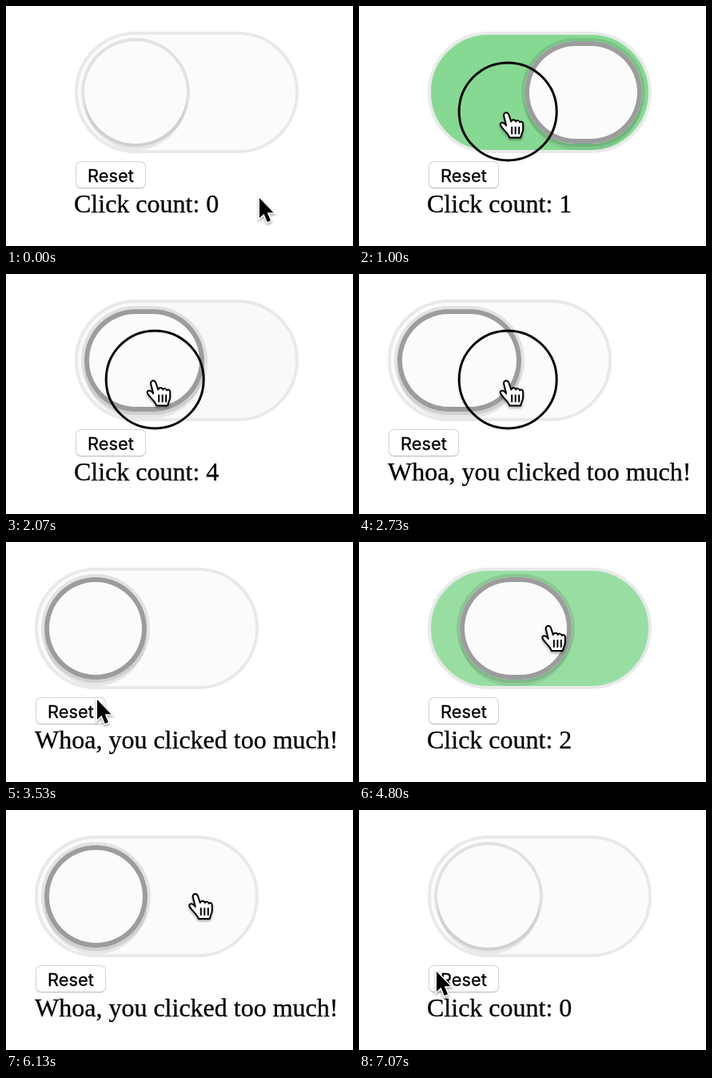
Write an HTML page that moves like this. It is 434x300 px and loops after 7140 ms.

```html
<!DOCTYPE html>
<html lang="en">
<head>
<meta charset="utf-8">
<title>Toggle click counter</title>
<style>
  html, body { margin: 0; width: 100%; height: 100%; overflow: hidden; background: #fff; }
  #stage { position: relative; width: 434px; height: 300px; overflow: hidden; background: #fff; }
  #panel { position: absolute; left: 86px; top: 0; }
  #track {
    position: absolute; left: 0; top: 32px; width: 280px; height: 152px;
    box-sizing: border-box; border: 4px solid #e8eae9; border-radius: 76px;
  }
  #knob {
    --ring: 0 0 0 4px rgba(0, 0, 0, .1), 0 8px 0 rgba(0, 0, 0, .08);
    position: absolute; left: 8px; top: 8px; width: 128px; height: 128px;
    border-radius: 64px; background: #fbfbfb; box-shadow: var(--ring);
  }
  #knob.focus { box-shadow: var(--ring), inset 0 0 0 6px #9c9c9c; }
  #reset, #label { color: #000; -webkit-text-stroke: .3px #000; }
  #reset {
    position: absolute; left: 1px; top: 194px; width: 88px; height: 34px;
    box-sizing: border-box; border: 1px solid #d4d4d4; border-bottom-color: #c2c2c2;
    border-radius: 7px; background: #fff; box-shadow: 0 1px 1px rgba(0, 0, 0, .08);
    font: 21.8px/35px Inter, Roboto, sans-serif; text-align: center;
  }
  #label {
    position: absolute; left: -1px; top: 229px; white-space: nowrap;
    font: 32px/36px "Liberation Serif", "Times New Roman", serif;
  }
  svg { position: absolute; left: 0; top: 0; }
  #pointer { filter: drop-shadow(0 2px 1.5px rgba(0, 0, 0, .35)); }
</style>
</head>
<body>
<div id="stage">
  <div id="panel">
    <div id="track"><div id="knob"></div></div>
    <div id="reset">Reset</div>
    <div id="label">Click count: 0</div>
  </div>
  <svg width="434" height="300" viewBox="0 0 434 300">
    <g id="cursor">
      <circle id="ring" cx="3" cy="-.6" r="61" fill="none" stroke="#000" stroke-width="3"/>
      <g id="pointer">
        <path id="arrow" d="M0 0V25L5.6 19.8L9.8 30L14 28.2L9.8 18.2H17.5Z"
          fill="#000" stroke="#fff" stroke-width="3" paint-order="stroke"/>
        <g id="hand" stroke="#000" stroke-width="2" stroke-linejoin="round" stroke-linecap="round">
          <path fill="#fff" d="M-2 5C-3 1 2-1 4 3L7 12C8 9 12 9 13 12C14 10 17 10 18 13C19 11 22 12 22 15V21C22 25 20 27 19 32H5C4 28 0 25-3 21C-5 18-8 16-6 14C-4 12-1 14 1 17Z"/>
          <path fill="none" d="M8 19V27M12.5 19V27M17 19V27"/>
        </g>
      </g>
    </g>
  </svg>
</div>
<script>
  const LOOP = 7140, SQUASH = 27.5, TRAVEL = 128, LIMIT = 4;
  const $ = id => document.getElementById(id);

  // Mouse down and up times on the toggle and on the reset button.
  const presses = [
    [480, 620], [880, 1030], [1260, 1400], [1580, 1760], [1930, 2110], [2270, 2400], [2470, 2860],
    [4060, 4170], [4648, 4748], [4950, 5050], [5245, 5345], [5540, 5640], [5800, 5900]
  ];
  const resets = [[3560, 3650], [6530, 6630]];

  // Pointer moves: start, end, x, y.
  const home = [317, 240];
  const moves = [
    [130, 430, 183.2, 132.5], [3050, 3480, 114, 197],
    [3650, 3800, 235.8, 104], [6130, 6330, 97, 202]
  ];

  const bezier = (x1, y1, x2, y2) => x => {
    if (x <= 0) return 0;
    if (x >= 1) return 1;
    const at = (a, b, s) => 3 * a * s * (1 - s) ** 2 + 3 * b * s * s * (1 - s) + s ** 3;
    let lo = 0, hi = 1;
    for (let i = 0; i < 24; i++) {
      const mid = (lo + hi) / 2;
      if (at(x1, x2, mid) < x) lo = mid; else hi = mid;
    }
    return at(y1, y2, lo);
  };
  const ease = bezier(.25, .1, .25, 1);
  const spring = bezier(.175, .885, .32, 1.275);
  const glide = bezier(.42, 0, .58, 1);

  // A value that eases from wherever it is to each new target.
  class Tween {
    constructor(duration, curve) {
      this.duration = duration;
      this.curve = curve;
      this.steps = [{ time: -1e4, from: 0, to: 0 }];
    }
    get target() { return this.steps[this.steps.length - 1].to; }
    go(time, to) {
      if (to !== this.target) this.steps.push({ time, from: this.at(time), to });
    }
    at(time) {
      const s = this.steps.findLast(step => step.time <= time);
      return s.from + (s.to - s.from) * this.curve((time - s.time) / this.duration);
    }
  }

  const left = new Tween(300, spring);
  const padding = new Tween(300, ease);
  const margin = new Tween(300, ease);
  const tint = new Tween(400, ease);
  const states = [{ time: 0, count: 0, focus: false }];

  const events = [
    ...presses.flatMap(([down, up]) => [{ time: down, type: "down" }, { time: up, type: "up" }]),
    ...resets.map(([, up]) => ({ time: up, type: "reset" }))
  ].sort((a, b) => a.time - b.time);

  let count = 0, on = 0;
  for (const { time, type } of events) {
    const down = type === "down";
    if (type === "up" && ++count <= LIMIT) on = 1 - on;
    if (type === "reset") count = on = 0;
    left.go(time, on * TRAVEL);
    tint.go(time, on);
    padding.go(time, down ? SQUASH : 0);
    margin.go(time, down && on ? -SQUASH : 0);
    states.push({ time, count, focus: type !== "reset" });
  }

  const held = (list, t) => list.some(([down, up]) => t >= down && t < up);
  const mix = (a, b, k) => Math.round(a + (b - a) * k);

  function pointerAt(t) {
    let [x, y] = home;
    for (const [start, end, tx, ty] of moves) {
      if (t < start) break;
      const k = glide((t - start) / (end - start));
      x += (tx - x) * k;
      y += (ty - y) * k;
    }
    return [x, y];
  }

  function draw(t) {
    const state = states.findLast(s => s.time <= t);
    const over = state.count > LIMIT;
    const origin = over ? 36 : 86;
    const k = tint.at(t);
    $("panel").style.left = origin + "px";
    $("label").style.left = over ? "0" : "-1px";
    $("label").textContent = over ? "Whoa, you clicked too much!" : "Click count: " + state.count;
    $("track").style.background = `rgb(${mix(251, 134, k)},${mix(251, 217, k)},${mix(251, 147, k)})`;
    $("knob").style.left = 8 + left.at(t) + margin.at(t) + "px";
    $("knob").style.width = 128 + padding.at(t) + "px";
    $("knob").classList.toggle("focus", state.focus);

    const [x, y] = pointerAt(t);
    const dx = Math.max(Math.abs(x - origin - 140) - 64, 0);
    const onTrack = Math.hypot(dx, y - 108) < 76;
    $("cursor").setAttribute("transform", `translate(${x} ${y})`);
    $("hand").style.display = onTrack ? "" : "none";
    $("arrow").style.display = onTrack ? "none" : "";
    $("ring").style.display = held(presses, t) || held(resets, t) ? "" : "none";
  }

  const begin = performance.now();
  function tick() {
    draw((performance.now() - begin) % LOOP);
    requestAnimationFrame(tick);
  }
  tick();
</script>
</body>
</html>
```
